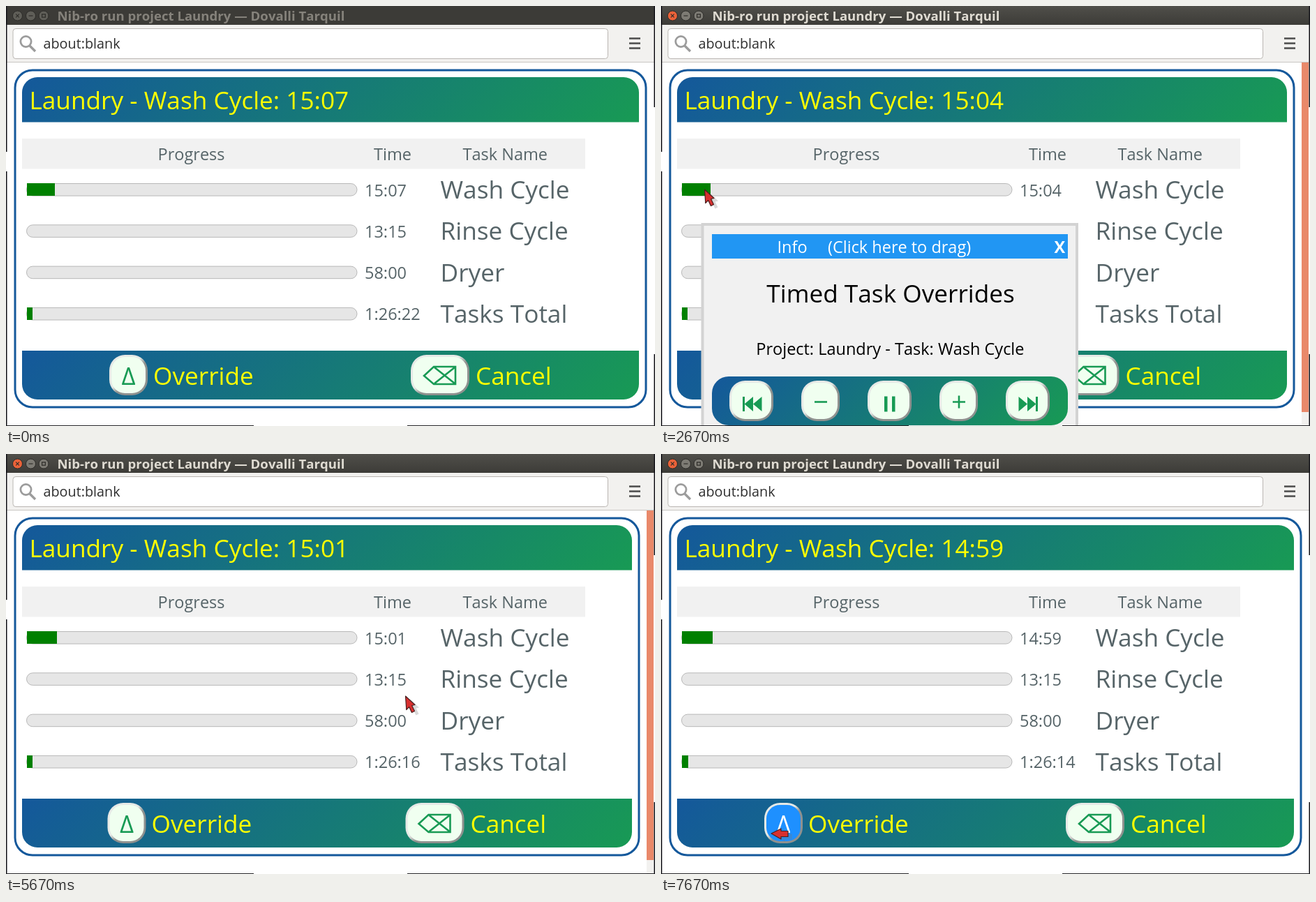
These frames come from a looping animation (930 px wide and 602 px high, 8 s). An HTML page:

```html
<!DOCTYPE html>
<html lang="en">
<head>
<meta charset="utf-8">
<title>Task timer</title>
<style>
html, body { margin: 0; width: 100%; height: 100%; overflow: hidden; background: #fff; }
svg { display: block; width: 100vw; height: 100vh; }
text { font-family: "Open Sans", "Noto Sans", sans-serif; font-kerning: none; white-space: pre; }
.big { font-size: 35.2px; }
.mid { font-size: 23.5px; }
.bold { font-weight: 700; }
.grey { fill: #566468; }
.yellow { fill: #ff0; }
.icon { fill: #189a54; }
.line { fill: none; stroke: #189a54; stroke-width: 2.6; }
</style>
</head>
<body>
<svg id="stage" viewBox="0 0 930 602"></svg>
<script>
const LOOP = 8000;
const stage = document.getElementById("stage");

// ---- markup helpers ----
const text = (x, y, cls, str, more = "") => `<text x="${x}" y="${y}" class="${cls}" ${more}>${str}</text>`;
const rect = (x, y, w, h, fill, more = "") => `<rect x="${x}" y="${y}" width="${w}" height="${h}" fill="${fill}" ${more}/>`;
const path = (d, more) => `<path d="${d}" ${more}/>`;

// same geometry as a 135 degree CSS gradient on a box
function gradient(id, x, y, w, h) {
  const cx = x + w / 2, cy = y + h / 2, r = (w + h) / 4;
  return `<linearGradient id="${id}" gradientUnits="userSpaceOnUse" x1="${cx - r}" y1="${cy - r}" x2="${cx + r}" y2="${cy + r}">
    <stop stop-color="#14589b"/><stop offset="1" stop-color="#189a54"/></linearGradient>`;
}

function button(x, y, w, icon, id = "") {
  return rect(x, y, w, 58, "url(#bevel)", 'rx="22.5"') +
    rect(x + 3, y + 3, w - 6, 52, "#f0fff0", `rx="19.5" ${id && `id="${id}"`}`) + icon;
}

function frame(id, right, shift) {
  const w = right - 23, r = 22;
  const top = `M23 166.5V${102 + r}a${r} ${r} 0 0 1 ${r} ${-r}H${right - r}a${r} ${r} 0 0 1 ${r} ${r}V166.5Z`;
  const foot = `M23 494H${right}V${564 - r}a${r} ${r} 0 0 1 ${-r} ${r}H${23 + r}a${r} ${r} 0 0 1 ${-r} ${-r}Z`;
  const erase = path("M599 530L613 517H644V542H613ZM614 518L643 541M643 518L614 541", 'class="line" stroke-width="2.4"');
  const delta = text(175.5, 543, "big icon", "Δ", `text-anchor="middle" id="${id}Delta"`);
  return `<g id="${id}"><defs>${gradient(id + "Top", 23, 102, w, 64)}${gradient(id + "Foot", 23, 494, w, 70)}</defs>
    ${rect(13, 92, right - 3, 483, "none", 'rx="25" stroke="#14589b" stroke-width="3"')}
    ${path(top, `fill="url(#${id}Top)"`)}${path(foot, `fill="url(#${id}Foot)"`)}
    <g transform="translate(${shift})">${button(148, 500, 55, delta, id + "Override")}${text(211, 542.5, "big yellow", "Override")}</g>
    <g transform="translate(${shift * 3})">${button(580, 500, 84, erase)}${text(673, 542.5, "big yellow", "Cancel")}</g></g>`;
}

function row(i, name, time) {
  const y = 254.5 + i * 59.3;
  return rect(29.5, y, 473.5, 17.6, "#e6e6e6", 'rx="8.8" stroke="#b8b8b8"') +
    rect(30, Math.floor(y), 0, 18, "#008000", `id="bar${i}"`) +
    text(514, 272.5 + i * 59.3, "mid grey", time, `id="time${i}"`) +
    text(622.5, 276 + i * 59.3, "big grey", name);
}

function chrome() {
  const dots = [16.5, 35.5, 54].map((x, i) =>
    `<circle cx="${x}" cy="14" r="7" class="dot" stroke="#2d2c29"/>` +
    path([`M${x - 2.3} 11.7l4.6 4.6m0-4.6l-4.6 4.6`, `M${x - 3} 14h6`, `M${x - 2.4} 11.8h4.8v4.4h-4.8z`][i],
      'fill="none" stroke="#2f2e2a" stroke-width="1.2"')).join("");
  return rect(0, 0, 930, 28, "#3c3b37", 'id="titlebar"') + dots +
    text(73.5, 21, "bold", "Nib-ro run project Laundry — Dovalli Tarquil", 'id="title" font-size="18.6"') +
    rect(0, 27, 930, 53, "#f2f1ef") + rect(0, 80, 930, 1, "#c9c6c3") +
    rect(10, 32.5, 852.5, 43, "#fff", 'rx="4" stroke="#bab6b2"') +
    '<circle cx="28.5" cy="51" r="7.6" fill="none" stroke="#9c9c9c" stroke-width="2.8"/>' +
    path("M34 57L42 65", 'stroke="#9c9c9c" stroke-width="3.4"') +
    text(53.5, 61, "", "about:blank", 'font-size="19.8" fill="#2e2e2e"') +
    path("M893 46.5h16M893 53.5h16M893 60.5h16", 'stroke="#4c4c4c" stroke-width="2.5"');
}

function popup() {
  const tri = (x, dx) => `M${x} 570.5l${dx} -10.5v21z`;
  const icons = [
    path("M117 560h3v21h-3z" + tri(119.5, 12.5) + tri(132, 12.5), 'class="icon"'),
    path("M220 567.5h18", 'class="line"'),
    path("M320 559.5h4.5v22h-4.5zM331 559.5h4.5v22h-4.5z", 'class="icon"'),
    path("M418 567.5h18M427 558.5v18", 'class="line"'),
    path("M537 560h3v21h-3z" + tri(537.5, -12.5) + tri(525, -12.5), 'class="icon"')
  ];
  const spots = [[98, 63], [201, 55], [296, 63], [399, 55], [494, 63]];
  return `<g id="popup"><defs>${gradient("tools", 73, 531, 510, 70)}</defs>
    ${rect(59.5, 313, 536.5, 310, "#f1f1f1", 'stroke="#d3d3d3" stroke-width="4"')}
    ${rect(73, 327, 510, 35, "#2196f3")}
    ${text(166.5, 354, "mid", "Info", 'fill="#fff"')}
    ${text(239, 354, "mid", "(Click here to drag)", 'fill="#fff"')}
    ${text(563.5, 354, "mid bold", "X", 'id="close"')}
    ${text(151.3, 424.5, "big", "Timed Task Overrides")}
    ${text(136.3, 500, "mid", "Project: Laundry - Task: Wash Cycle")}
    ${rect(73, 531, 510, 70, "url(#tools)", 'rx="24"')}
    ${spots.map(([x, w], i) => button(x, 537, w, icons[i])).join("")}</g>`;
}

function pointer(id, d) {
  return `<g id="${id}">${path(d, 'transform="translate(6 4)" fill="#777" opacity=".28"')}
    ${path(d, 'fill="#d8302f" stroke="#4a2020" stroke-width="1.2" stroke-linejoin="round"')}</g>`;
}

stage.innerHTML = `<defs>
  <linearGradient id="bevel" x2="1" y2="1"><stop offset=".44" stop-color="#e6e9e6"/><stop offset=".56" stop-color="#8f918f"/></linearGradient>
  <linearGradient id="active" x2="0" y2="1"><stop stop-color="#504f4a"/><stop offset="1" stop-color="#3c3b37"/></linearGradient></defs>
  ${rect(0, 0, 930, 602, "#fff")}${chrome()}
  ${frame("wide", 907, 0)}${frame("narrow", 897, -2.5)}
  ${text(33.5, 148, "big yellow", "", 'id="heading"')}
  ${rect(23, 190, 807, 43.5, "#f1f1f1")}
  ${text(217.5, 220.5, "mid grey", "Progress")}${text(527, 220.5, "mid grey", "Time")}${text(654.5, 220.5, "mid grey", "Task Name")}
  ${row(0, "Wash Cycle", "")}${row(1, "Rinse Cycle", "13:15")}${row(2, "Dryer", "58:00")}${row(3, "Tasks Total", "")}
  ${popup()}
  <g id="scroll">${rect(918, 81, 10, 501, "#e9896a")}${rect(918, 582, 10, 20, "#f2f1ef")}</g>
  ${rect(0, 0, 1.5, 209, "#15151a")}${rect(0, 237, 1.5, 365, "#15151a")}
  ${rect(928.5, 0, 1.5, 145, "#15151a")}${rect(928.5, 499, 1.5, 103, "#15151a")}
  ${rect(0, 601, 355, 1, "#26262a")}${rect(575, 601, 355, 1, "#26262a")}
  <g id="cursor">${pointer("arrow", "M-0.5 -1L13 11.5L8.6 12.5L12.5 20.5L8.5 22.5L4.6 14.6L0.8 18.5Z")}
  ${pointer("hand", "M0 0L14 -7V-3.5H24V4.5H14V8Z")}</g>`;

const el = {};
stage.querySelectorAll("[id]").forEach(e => el[e.id] = e);
const dots = [...stage.querySelectorAll(".dot")];

// ---- timeline ----
const TICKS = [80, 1830, 2080, 3080, 4080, 5080, 6130, 7080];
const BAR_STEPS = [1830, 3290, 5330, 7330];   // bars advance two seconds at a time
const TASK = 990, TOTAL = TASK + 795 + 3480, START = 83;
const ROUTE = [
  [460, 12, -8], [1040, 100, 192], [1829, 100, 192], [1830, 82, 238], [1920, 63, 264],
  [3420, 63, 264], [3580, 137, 274], [3920, 137, 274], [4170, 541, 362], [4290, 541, 362],
  [4600, 557, 366], [5130, 573, 348], [6090, 573, 348], [6290, 549, 347], [6630, 440, 420],
  [6750, 440, 420], [7460, 187, 520], [7669, 187, 520], [7670, 158, 544], [LOOP, 158, 544]
];

const passed = (list, t) => list.filter(k => t >= k).length;
const show = (e, on) => e.setAttribute("display", on ? "inline" : "none");
const inside = ([x, y], l, t, r, b) => x >= l && x <= r && y >= t && y <= b;

function clock(s) {
  const two = n => String(n).padStart(2, "0");
  const h = Math.floor(s / 3600), m = Math.floor(s / 60) % 60;
  return (h ? h + ":" + two(m) : m) + ":" + two(s % 60);
}

function route(t) {
  const i = ROUTE.findIndex(k => k[0] > t);
  if (i < 1) return ROUTE[0].slice(1);
  const [t0, x0, y0] = ROUTE[i - 1], [t1, x1, y1] = ROUTE[i];
  const k = (t - t0) / (t1 - t0);
  return [x0 + (x1 - x0) * k, y0 + (y1 - y0) * k];
}

function draw(t) {
  const spent = START + passed(TICKS, t);
  const shown = START + 2 * passed(BAR_STEPS, t);
  const open = t >= 2670 && t < 5670;
  const narrow = t >= 2670 && t < 6130;
  const focus = t >= 2630;

  el.heading.textContent = "Laundry - Wash Cycle: " + clock(TASK - spent);
  el.time0.textContent = clock(TASK - spent);
  el.time3.textContent = clock(TOTAL - spent);
  [[el.bar0, TASK], [el.bar3, TOTAL]].forEach(([bar, total]) =>
    bar.setAttribute("width", Math.floor(0.85 + 473 * shown / total)));

  show(el.popup, open);
  show(el.scroll, narrow);
  show(el.narrow, narrow);
  show(el.wide, !narrow);

  el.titlebar.setAttribute("fill", focus ? "url(#active)" : "#3c3b37");
  el.title.setAttribute("fill", focus ? "#dfdbd2" : "#85827b");
  dots.forEach((d, i) => d.setAttribute("fill", !focus ? "#5f5e58" : i ? "#7d7b74" : "#ea6239"));

  const at = route(t);
  const onClose = open && inside(at, 562, 328, 583, 361);
  const onButton = !narrow && inside(at, 148, 500, 203, 558);
  show(el.cursor, t >= 500);
  el.cursor.setAttribute("transform", `translate(${at})`);
  show(el.hand, onClose || onButton);
  show(el.arrow, !onClose && !onButton);
  el.close.setAttribute("fill", onClose ? "#000" : "#fff");
  el.wideOverride.setAttribute("fill", onButton ? "#1e90ff" : "#f0fff0");
  el.wideDelta.style.fill = onButton ? "#fff" : "";
}

function tick() {
  draw(performance.now() % LOOP);
  requestAnimationFrame(tick);
}
tick();
</script>
</body>
</html>
```
